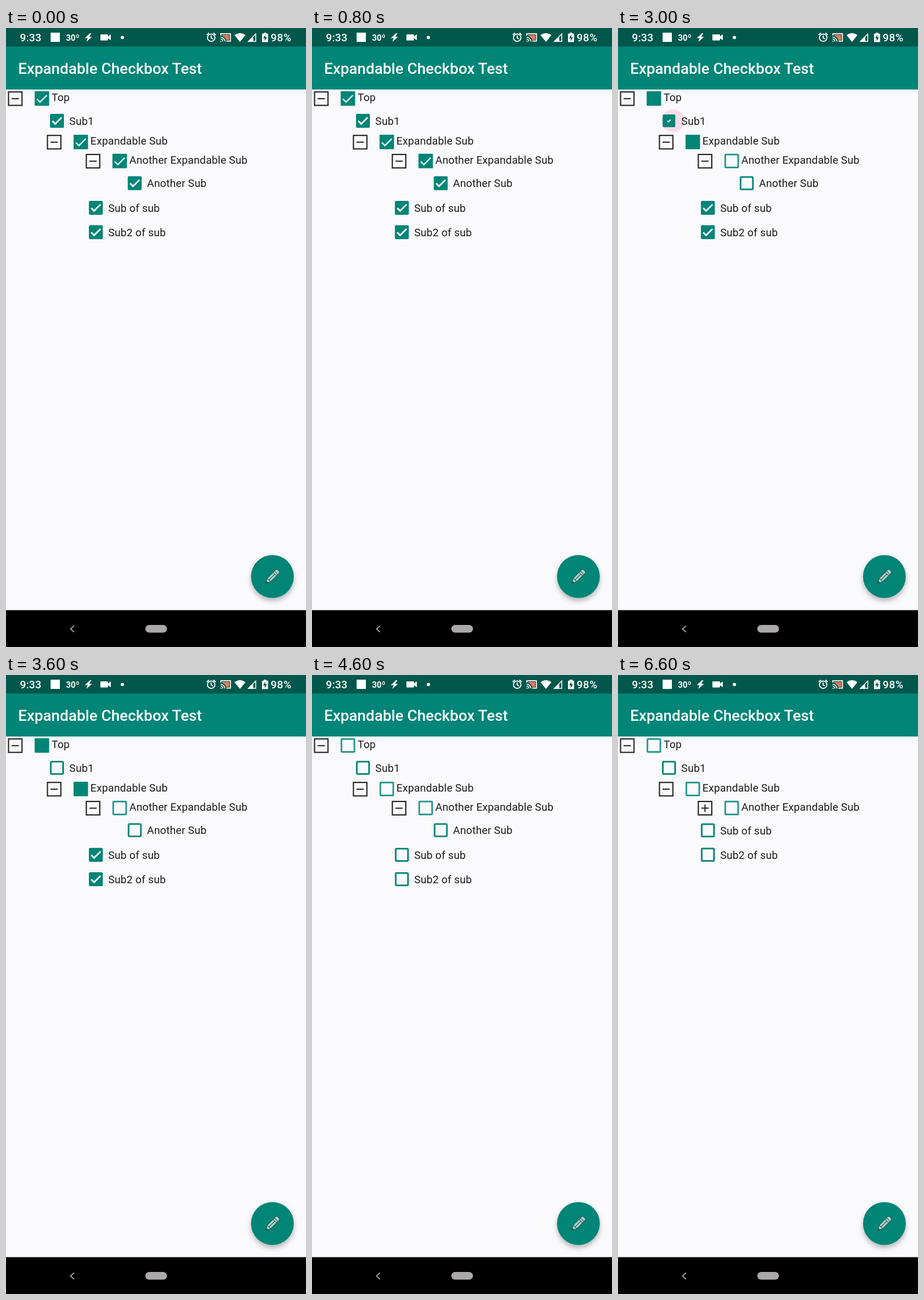
Animation, 518 px wide and 1067 px high, one loop 8000 ms. Source, as an HTML page:

```html
<!DOCTYPE html>
<html lang="en">
<head>
<meta charset="utf-8">
<title>Expandable Checkbox Test</title>
<style>
  html, body { margin: 0; width: 100%; height: 100%; overflow: hidden; background: #faf9fc; }
  svg { display: block; width: 518px; height: 1067px; }
  text { font-family: Roboto, sans-serif; }
  .label { font-size: 18.47px; letter-spacing: .14px; fill: #1b1b1d; }
  .title { font-size: 26.38px; font-weight: 500; fill: #fff; }
  .status { font-size: 18.5px; font-weight: 500; fill: #fff; }
</style>
</head>
<body>
<svg viewBox="0 0 518 1067">
  <defs>
    <filter id="shadow" x="-30%" y="-30%" width="160%" height="170%">
      <feDropShadow dx="0" dy="5" stdDeviation="4" flood-color="#000" flood-opacity=".27"/>
    </filter>
  </defs>
  <rect width="518" height="1067" fill="#faf9fc"/>
  <rect width="518" height="106" fill="#008577"/>
  <rect width="518" height="32" fill="#00574b"/>
  <text class="title" x="21" y="79.3">Expandable Checkbox Test</text>

  <g id="statusBar" fill="#fff">
    <text class="status" x="24" y="23" letter-spacing=".2">9:33</text>
    <rect x="77" y="8" width="16" height="16"/>
    <text x="103.5" y="22" font-size="14.5" font-weight="700">30º</text>
    <path d="M145 9L136 17.6H141L138.500 24L148.500 15.300H143.500L147.500 9Z"/>
    <path d="M164 11H175Q176 11 176 12V14.600L181 11V21L176 17.800V20.500Q176 21.500 175 21.500H164Q163 21.500 163 20.500V12Q163 11 164 11Z"/>
    <circle cx="201" cy="16.300" r="2.900"/>
    <g fill="none" stroke="#fff" stroke-width="1.800">
      <circle cx="354.300" cy="16.700" r="6.400"/>
      <path d="M354.300 12.800V17L357.300 19M346.500 12L350.500 8.500M362.100 12L358.100 8.500"/>
      <path d="M371 13V9.800H387.500V22.700H380.500"/>
      <path d="M370.500 15.800A8 8 0 0 1 378 23.200M370.500 19A4.500 4.500 0 0 1 374.500 23.200" stroke-width="1.600"/>
    </g>
    <path d="M373.500 12H385.300V20.700H380.500Q378.500 15 373.500 13.700Z" fill="#e9785d"/>
    <path d="M370.500 21.500A2.300 2.300 0 0 1 372.500 23.700H370.500Z"/>
    <path d="M394.500 12.300Q404 5.300 413.500 12.300L404 24Z"/>
    <path d="M418.500 23L431.300 10.300V23Z" fill="none" stroke="#fff" stroke-width="1.500"/>
    <path d="M417.500 23.700L427 14.300V23.700Z"/>
    <path d="M445 8H449.500V9.800H452.500V24.300H442V9.800H445Z"/>
    <path d="M447.800 11.500L444 17.800H446.700V22.500L450.600 16H447.800Z" fill="#00574b"/>
    <text class="status" x="457" y="23" letter-spacing=".45">98%</text>
  </g>

  <g id="ripples"></g>
  <g id="tree"></g>

  <circle cx="460" cy="945.500" r="37" fill="#008577" filter="url(#shadow)"/>
  <g transform="translate(448.500 957) rotate(-45)" stroke="#26544e" stroke-width="1" stroke-linejoin="round">
    <path d="M0 0L8 -4.300H27.500Q31 -4.300 31 -1V1Q31 4.300 27.500 4.300H8Z" fill="#a9d1cb"/>
    <path d="M8 -4.300V4.300M8 0H22M22 -4.300V4.300M25.500 -4.300V4.300" fill="none"/>
    <path d="M0 0L3 -1.500V1.500Z" fill="#26544e"/>
  </g>

  <rect y="1003.500" width="518" height="64"/>
  <path d="M117.500 1030.300L111.500 1035.800L117.500 1041.300" fill="none" stroke="#a8a8a8" stroke-width="1.800"/>
  <rect x="240.500" y="1029" width="37.500" height="13.300" rx="6.650" fill="#aaa8a9"/>
</svg>
<script>
const LOOP = 8000, STEP = 200, TEAL = '#008577';
const INDENT = 67.15, ROW = 42.2;
const COLLAPSE = 6200;
const tree = document.getElementById('tree');
const ripples = document.getElementById('ripples');

// Group rows: click time decides when the box turns partial or empty.
const groups = [
  { name: 'Top', depth: 0, y: 121.5, partial: 2200, empty: 4200 },
  { name: 'Expandable Sub', depth: 1, y: 196.5, partial: 2200, empty: 4200 },
  { name: 'Another Expandable Sub', depth: 2, y: 229.3, partial: 2200, empty: 2200 }
];
const leaves = [
  { name: 'Sub1', depth: 1, y: 160, off: 3000 },
  { name: 'Another Sub', depth: 3, y: 267.5, off: 2200, folds: true },
  { name: 'Sub of sub', depth: 2, y: 310, off: 3800, slides: true },
  { name: 'Sub2 of sub', depth: 2, y: 352, off: 4200, slides: true }
];
const taps = [
  { x: 196.3, y: 229.3, at: 2200 },
  { x: 88, y: 160, at: 3000 },
  { x: 155, y: 310, at: 3800 },
  { x: 155, y: 352, at: 4200 }
];

const square = (x, y, size, attrs) =>
  `<rect x="${x - size / 2}" y="${y - size / 2}" width="${size}" height="${size}" ${attrs}/>`;
const frame = (x, y, size, width, color, rx) =>
  square(x, y, size - width, `rx="${rx}" fill="none" stroke="${color}" stroke-width="${width}"`);
const tick = (x, y, scale, width, color) =>
  `<path transform="translate(${x} ${y}) scale(${scale})" d="M-8 .3L-3 5.300L8 -5.700" fill="none" stroke="${color}" stroke-width="${width}"/>`;
const label = (x, y, name) => `<text class="label" x="${x}" y="${y}">${name}</text>`;

function drawGroup(g, t) {
  const shift = g.depth * INDENT;
  const iconX = 16 + shift, boxX = 62 + shift;
  const folded = g.depth === 2 && t > COLLAPSE;
  const bars = 'M-6.300 0H6.300' + (folded ? 'M0 -6.300V6.300' : '');
  let box;
  if (t >= g.empty) box = frame(boxX, g.y, 25, 2.7, '#1f9488', 1);
  else box = square(boxX, g.y, 25, `rx="1" fill="${TEAL}"`) +
    (t < g.partial ? tick(boxX, g.y + .5, 1.08, 2.3, '#d3f0eb') : '');
  return frame(iconX, g.y + .3, 25.3, 2.1, '#242326', 0) +
    `<path transform="translate(${iconX} ${g.y + .3})" d="${bars}" stroke="#242326" stroke-width="2"/>` +
    box + label(78.7 + shift, g.y + 4.9, g.name);
}

function drawLeaf(leaf, t, slide) {
  const x = 88 + (leaf.depth - 1) * INDENT;
  const y = leaf.y - (leaf.slides ? slide * ROW : 0);
  const phase = t < leaf.off ? -1 : (t - leaf.off) / STEP;
  let box;
  if (phase < 0) box = square(x, y, 24, `rx="2" fill="${TEAL}"`) + tick(x, y, 1, 2.7, '#fff');
  else if (phase < 1) box = square(x, y, 21.8, `rx="2" fill="${TEAL}"`) + tick(x, y, .34, 5.5, '#fff');
  else box = frame(x, y, 24, phase < 2 ? 4 : 2.8, TEAL, 1.5);
  const opacity = !leaf.folds || t < COLLAPSE ? 1 : t < COLLAPSE + STEP ? .35 : 0;
  return `<g opacity="${opacity}">${box}${label(x + 21.3, y + 6.7, leaf.name)}</g>`;
}

function drawRipple(tap, t) {
  const age = (t - tap.at) / STEP;
  if (age < 0 || age >= 2) return '';
  return age < 1
    ? `<circle cx="${tap.x + 7}" cy="${tap.y}" r="19.500" fill="#f9dbe8"/>`
    : `<circle cx="${tap.x}" cy="${tap.y}" r="25.500" fill="#f5f4f5"/>`;
}

function render(time) {
  const t = Math.floor(time % LOOP / STEP) * STEP;
  const slide = t <= COLLAPSE ? 0 : t <= COLLAPSE + STEP ? .65 : 1;
  ripples.innerHTML = taps.map(tap => drawRipple(tap, t)).join('');
  tree.innerHTML = groups.map(g => drawGroup(g, t)).join('') +
    leaves.map(leaf => drawLeaf(leaf, t, slide)).join('');
}

const start = performance.now();
function loop() {
  render(performance.now() - start);
  requestAnimationFrame(loop);
}
loop();
</script>
</body>
</html>
```
